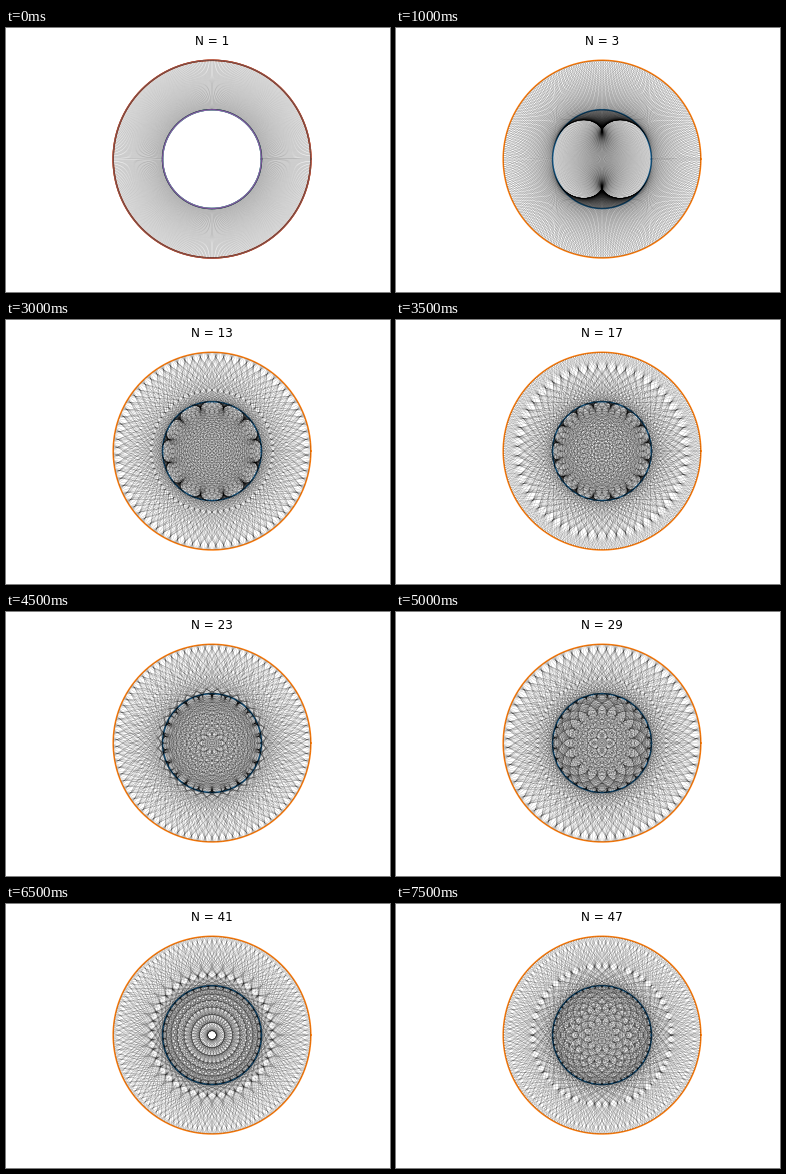
Recreate the animation shown at these times as a matplotlib script. Size 384 px wide and 264 px high, loop 8000 ms.

```python
import matplotlib.pyplot as plt
import numpy as np
from matplotlib.animation import FuncAnimation
from matplotlib.collections import LineCollection

W, H, DPI = 384, 264, 72
UNIT = 49.42          # pixels per data unit
CX, CY = 206, 131.1   # centre of the rings, from the top left
POINTS = 1000

factors = [1] + [n for n in range(2, 48) if all(n % d for d in range(2, n))]

fig = plt.figure(figsize=(W / DPI, H / DPI), dpi=DPI, facecolor="white")
ax = fig.add_axes([0, 0, 1, 1])
ax.set_xlim(-CX / UNIT, (W - CX) / UNIT)
ax.set_ylim((CY - H) / UNIT, CY / UNIT)
ax.axis("off")

theta = np.linspace(0, 2 * np.pi, POINTS + 1)


def ring(radius, angle):
    return radius * np.column_stack([np.cos(angle), np.sin(angle)])


def add_rings(inner, outer):
    return [ax.plot(*ring(r, theta).T, color=c, lw=1.5, zorder=2)[0]
            for r, c in ((1, inner), (2, outer))]


add_rings("C0", "C1")
overlay = add_rings("C2", "C3") + add_rings("C4", "C5")
chords = LineCollection([], colors="black", linewidths=0.1, zorder=3)
ax.add_collection(chords, autolim=False)
title = fig.text(CX / W, 1 - 16.6 / H, "", fontsize=12, family="DejaVu Sans",
                 ha="center", va="baseline")


def update(i):
    n = factors[i]
    chords.set_segments(np.stack([ring(1, theta), ring(2, n * theta)], axis=1))
    for line in overlay:
        line.set_visible(n == 1)
    title.set_text(f"N = {n}")
    return [chords, title, *overlay]


anim = FuncAnimation(fig, update, frames=len(factors), interval=500,
                     repeat=True, repeat_delay=0, blit=False)
plt.show()
```
